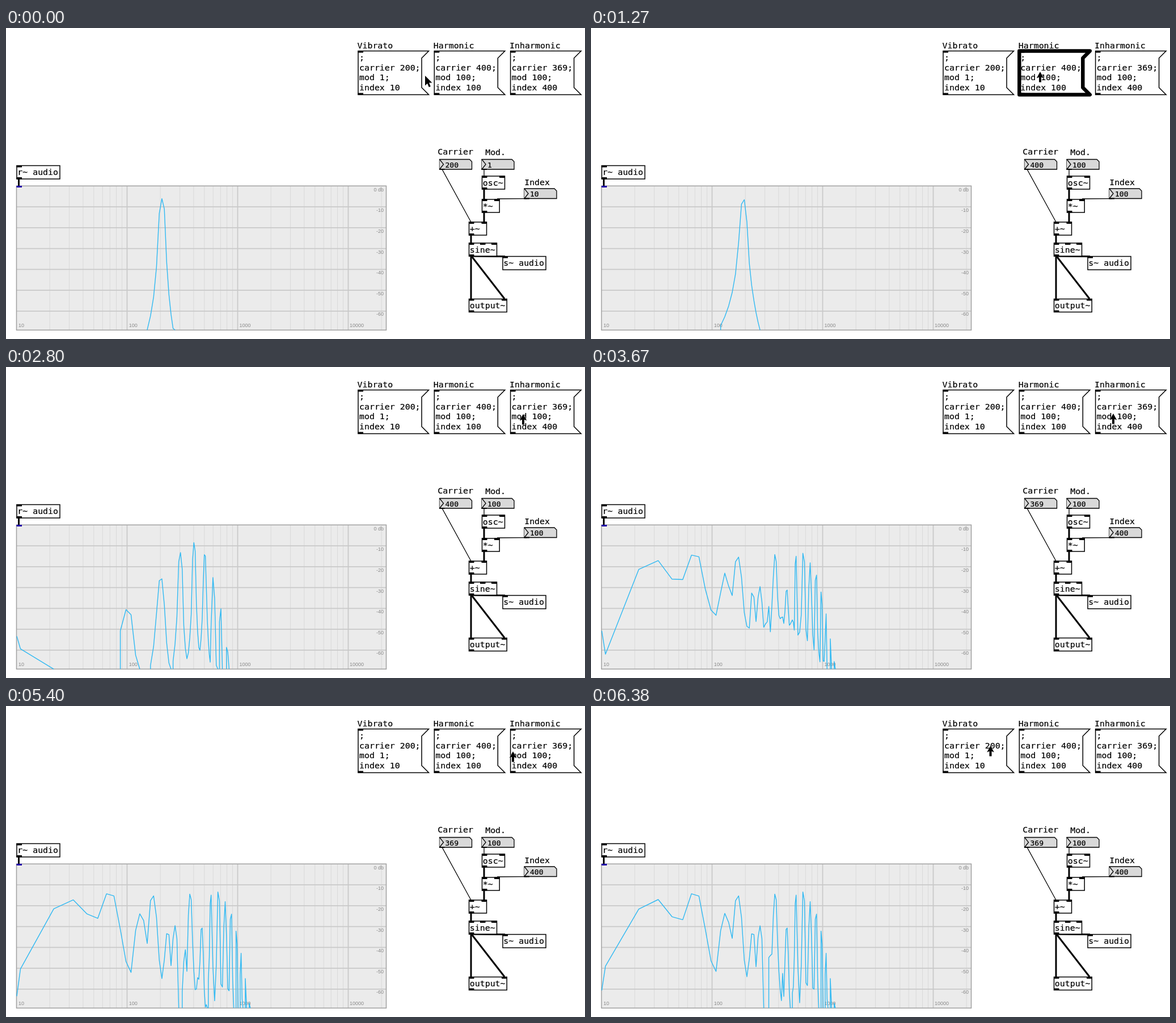
An HTML page that plays this animation: 1021 by 548 pixels, repeating every 6.5 s.

```html
<!DOCTYPE html>
<html lang="en">
<head>
<meta charset="utf-8">
<title>FM synthesis patch</title>
<style>
  html, body { margin: 0; width: 100%; height: 100%; overflow: hidden; background: #fff; }
  svg { display: block; width: 1021px; height: 548px; }
  text { font: 14.9px "DejaVu Sans Mono", monospace; fill: #000; stroke: #000; stroke-width: 0.2; }
  .value { font-size: 13px; }
  .axis { font: 9px "Liberation Sans", Arial, sans-serif; fill: #8a8a8a; stroke: none; }
  .end { text-anchor: end; }
  .box { fill: #fff; stroke: #000; stroke-width: 1.5; }
  .num { fill: #d9d9d9; stroke: #000; stroke-width: 1.3; }
  .cord { stroke: #000; stroke-width: 1.3; }
  .signal { stroke-width: 3; }
  .major { stroke: #c9c9c9; stroke-width: 1.8; }
  .minor { stroke: #d9d9d9; stroke-width: 1; }
  .plot { fill: #ebebeb; }
  .frame { fill: none; stroke: #a0a0a0; stroke-width: 1.5; }
  .curve { fill: none; stroke: #30b9f2; stroke-width: 1.4; stroke-linejoin: round; }
  .flash { fill: none; stroke: #000; stroke-width: 6.5; stroke-linejoin: round; }
  .cursor { fill: #000; stroke: #fff; stroke-width: 0.8; paint-order: stroke; }
</style>
</head>
<body>
<svg id="stage" viewBox="0 0 1021 548"></svg>
<script>
const LOOP = 6500, TICK = 200 / 3;
const stage = document.getElementById('stage');

function add(tag, attrs, content = '') {
  const node = document.createElementNS('http://www.w3.org/2000/svg', tag);
  for (const name in attrs) node.setAttribute(name, attrs[name]);
  node.textContent = content;
  return stage.appendChild(node);
}
const text = (x, y, s, cls = '') => add('text', { x, y, class: cls }, s);
const path = (d, cls) => add('path', { d, class: cls });
const line = (x1, y1, x2, y2, cls) => add('line', { x1, y1, x2, y2, class: cls });
const port = (x, y, h = 3.5, fill = '#000') => add('rect', { x, y, width: 9.5, height: h, fill });

// ---- Plot ----
const plot = { x: 18.5, y: 278.3, w: 652, h: 254, decade: 195, db: 3.675 };
const bottom = plot.y + plot.h;

function drawPlot() {
  const area = { x: plot.x, y: plot.y, width: plot.w, height: plot.h };
  add('rect', { ...area, class: 'plot' });
  const vertical = (hz, cls) => {
    const x = plot.x + plot.decade * Math.log10(hz / 10);
    if (x < plot.x + plot.w) line(x, plot.y, x, bottom, cls);
  };
  for (let base = 10; base <= 10000; base *= 10)
    for (let m = 2; m < 10; m++) vertical(base * m, 'minor');
  for (let n = 1; n < 7; n++) {
    const y = plot.y + n * 10 * plot.db;
    line(plot.x, y, plot.x + plot.w, y, 'major');
  }
  for (let n = 0; n < 4; n++) {
    if (n) vertical(10 ** (n + 1), 'major');
    text(22 + n * 194.7, 527.3, 10 ** (n + 1), 'axis');
  }
  for (let n = 0; n < 7; n++)
    text(666, 287.7 + n * 36.6, n ? -10 * n : '0 db', 'axis end');
  add('rect', { ...area, class: 'frame' });
}

// ---- Patch ----
function object(label, x, y, w, h, inlets, outlet = true) {
  add('rect', { x, y, width: w, height: h, class: 'box' });
  inlets.forEach(dx => port(x - 0.5 + dx, y - 0.5));
  if (outlet) port(x - 0.5, y + h - 3);
  text(x + 1.3, y + h / 2 + 5, label);
}

function numberBox(x, y) {
  path(`M${x} ${y}h53l4 4v13.5h-57z`, 'num');
  path(`M${x} ${y}l7 8.7l-7 8.8`, 'num');
  port(x - 0.5, y + 16.5, 2);
  return text(x + 10, y + 14, '', 'value');
}

const outline = x => `M${x} 40.5h124.5l-12.5 12.5v52l12.5 12.5h-124.5z`;

function message(x, title, lines) {
  text(x - 1.5, 35.5, title);
  path(outline(x), 'box');
  port(x - 0.5, 40);
  port(x - 0.5, 114.5);
  lines.forEach((s, i) => text(x + 2, 57 + i * 17.6, s));
}

drawPlot();
object('r~ audio', 19, 242.5, 76, 23.5, [0]);
line(22.5, 266, 22.5, 278, 'cord signal');
port(18.5, 278, 3, '#2000a8');

const voices = [
  { start: 0, shown: 0, title: 'Vibrato', carrier: 200, mod: 1, index: 10 },
  { start: 1.24668, shown: 1260, title: 'Harmonic', carrier: 400, mod: 100, index: 100 },
  { start: 3.51, shown: 3530, title: 'Inharmonic', carrier: 369, mod: 100, index: 400 }
];
voices.forEach((v, i) => {
  v.x = 621 + i * 134.3;
  message(v.x, v.title, [';', `carrier ${v.carrier};`, `mod ${v.mod};`, `index ${v.index}`]);
});

line(769, 249, 820, 342, 'cord');
line(843, 249, 843, 261, 'cord');
line(919, 300.7, 866, 301, 'cord');
line(843, 284, 843, 302, 'cord signal');
line(843, 325, 843, 342, 'cord signal');
line(820, 365, 820, 379, 'cord signal');
line(820, 401, 820, 477, 'cord signal');
line(820, 401, 879, 477, 'cord signal');
line(820, 402, 880, 402.5, 'cord signal');
text(761.2, 223, 'Carrier');
text(845.2, 224, 'Mod.');
text(914.2, 277, 'Index');
const readouts = {
  carrier: numberBox(764.5, 231.5),
  mod: numberBox(839, 231.5),
  index: numberBox(914, 283)
};
object('osc~', 839.5, 261, 40, 23, [0, 31]);
object('*~', 839.5, 302, 30.7, 23, [0, 22]);
object('+~', 816.5, 342, 31, 23, [0, 22.5]);
object('sine~', 816.5, 379, 49, 23, [0, 20, 40]);
object('s~ audio', 876, 402.5, 76, 23.5, [0], false);
object('output~', 816.5, 477.5, 66.7, 23, [0, 58]);

// ---- Sound: a frequency-modulated sine, each voice continuing the phases of the last ----
const RATE = 44100, SIZE = 4096, BINS = 240, TAU = 2 * Math.PI;
const swing = (v, theta) => v.index / v.mod * Math.sin(TAU * theta) / TAU;
const modPhase = (v, s) => v.theta + v.mod * (s - v.start);
const phase = (v, s) => v.offset + v.carrier * (s - v.start) + swing(v, modPhase(v, s));

Object.assign(voices[0], { theta: 0.331, offset: 0.813 });
for (let i = 1; i < voices.length; i++) {
  const v = voices[i], last = voices[i - 1];
  v.theta = modPhase(last, v.start);
  v.offset = phase(last, v.start) - swing(v, v.theta);
}

function sound(s) {
  const v = s >= voices[2].start ? voices[2] : s >= voices[1].start ? voices[1] : voices[0];
  return Math.sin(TAU * phase(v, s));
}

// Hann-windowed level of each bin in dB, by the Goertzel recurrence
function analyse(endMs) {
  const block = Array.from({ length: SIZE }, (_, i) =>
    sound(endMs / 1000 - (SIZE - i) / RATE) * (0.5 - 0.5 * Math.cos(TAU * i / SIZE)));
  return Array.from({ length: BINS }, (_, k) => {
    const c = 2 * Math.cos(TAU * k / SIZE);
    let a = 0, b = 0;
    for (const x of block) [a, b] = [x + c * a - b, a];
    const power = Math.max(a * a + b * b - c * a * b, 1e-12);
    return 20 * Math.log10(Math.sqrt(power) * 2 / SIZE);
  });
}

// Bins closer than 1.6 px share one point at the louder level
function curve(levels) {
  const points = [];
  levels.forEach((db, k) => {
    const x = k ? 25.5 + plot.decade * Math.log10(k) : 19;
    const y = Math.min(bottom, plot.y - db * plot.db);
    const last = points[points.length - 1];
    if (last && x - last.x < 1.6) last.y = Math.min(last.y, y);
    else points.push({ x, y });
  });
  let d = '', open = false;
  points.forEach(({ x, y }, i) => {
    const above = y < bottom;
    const at = `${x.toFixed(1)} ${y.toFixed(1)}`;
    if (above && !open) d += i ? `M${x.toFixed(1)} ${bottom}L${at}` : `M${at}`;
    else if (open) d += `L${at}`;
    open = above;
  });
  return d;
}

const HOP = 2 * SIZE / RATE * 1000, FIRST = 59.2;
const curves = new Map();
function curveAt(T) {
  const k = Math.floor((T - FIRST) / HOP);
  if (!curves.has(k)) curves.set(k, curve(analyse(FIRST + k * HOP)));
  return curves.get(k);
}

// ---- Moving parts ----
const spectrum = path('', 'curve');
const flash = path('', 'flash');
const cursor = path('', 'cursor');
const POINTER = 'M0 0V17.5L4 13.8L6.8 20.3L9.8 19L7 12.6H12.4Z';
const UP = 'M0 0L6.3 11.5L2 9.8V18.5H-2V9.8L-6.3 11.5Z';

// time, x, y
const track = [
  [0, 739, 84], [470, 792, 77], [2400, 792, 77], [2800, 912, 83], [2930, 921, 82],
  [5200, 921, 82], [5400, 894, 80], [5870, 725, 71], [6200, 704.5, 70], [LOOP, 704.5, 70]
];

function cursorAt(T) {
  const i = Math.max(1, track.findIndex(p => p[0] >= T));
  const [t0, x0, y0] = track[i - 1], [t1, x1, y1] = track[i];
  const p = (T - t0) / (t1 - t0);
  return [x0 + (x1 - x0) * p, y0 + (y1 - y0) * p];
}

function draw(t) {
  // The screen refreshes 15 times a second; the last step comes slightly early
  const T = t >= 6380 ? 6400 : Math.floor((t + 3.4) / TICK) * TICK;
  spectrum.setAttribute('d', curveAt(T));

  const voice = voices.filter(v => T >= v.shown).pop();
  for (const name in readouts) readouts[name].textContent = voice[name];
  const lit = voice.shown && T < voice.shown + 130;
  flash.setAttribute('d', lit ? outline(voice.x) : '');

  const [x, y] = cursorAt(T);
  const over = voices.some(v => x >= v.x && x <= v.x + 115);
  cursor.setAttribute('d', over ? UP : POINTER);
  cursor.setAttribute('transform', `translate(${x} ${y})`);
}

const begin = performance.now();
function tick() {
  draw((performance.now() - begin) % LOOP);
  requestAnimationFrame(tick);
}
tick();
</script>
</body>
</html>
```
